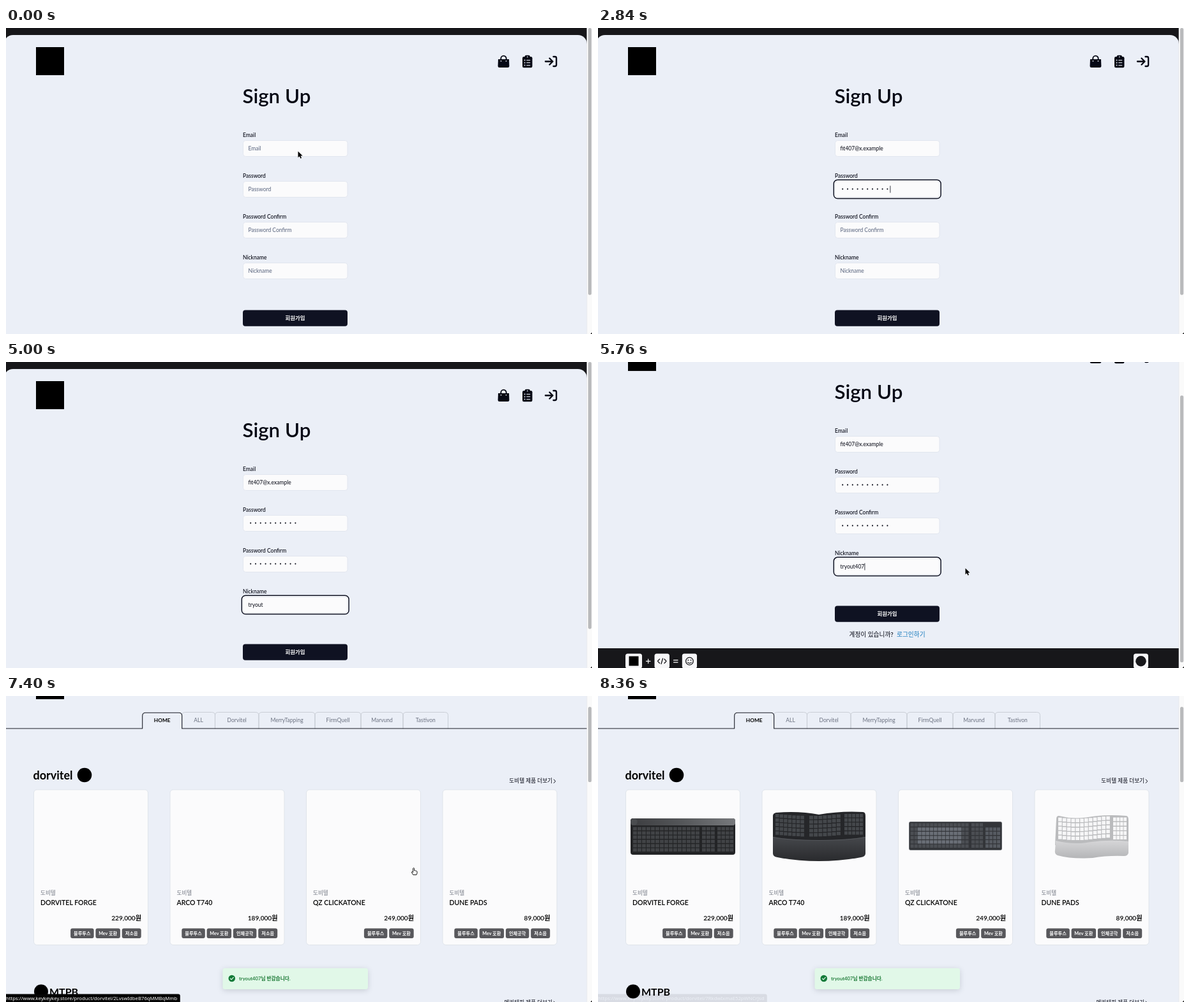
An HTML page that plays this animation: 918 by 480 pixels, repeating every 8400 ms.

```html
<!DOCTYPE html>
<html lang="ko">
<head>
<meta charset="utf-8">
<title>Sign Up</title>
<style>
  html, body { margin: 0; width: 100%; height: 100%; overflow: hidden; background: #ebeff7; }
  svg { display: block; width: 918px; height: 480px; font-family: Lato, "Noto Sans CJK KR", "Noto Sans CJK", sans-serif; }
  .toast { filter: drop-shadow(0 2.5px 4.5px rgba(20, 30, 45, .16)); }
</style>
</head>
<body>
<svg id="stage" viewBox="0 0 918 480" xmlns="http://www.w3.org/2000/svg">
  <defs>
    <linearGradient id="metal"><stop offset="0" stop-color="#3c3d40"/><stop offset=".5" stop-color="#55575a"/><stop offset="1" stop-color="#77797c"/></linearGradient>
    <linearGradient id="rest" x2="0" y2="1"><stop offset="0" stop-color="#46484c"/><stop offset="1" stop-color="#292a2d"/></linearGradient>
    <linearGradient id="pale" x2="0" y2="1"><stop offset="0" stop-color="#d6d6d8"/><stop offset="1" stop-color="#b4b5b7"/></linearGradient>
  </defs>
</svg>
<script>
const LOOP = 8400, MAX_SCROLL = 69;
const INK = '#060814', BG = '#ebeff7', CARD = '#fbfbfc', DARK = '#17171a', NAVY = '#0f1222';
const LOADING_AT = 6640, HOME_AT = 7160;

const stage = document.getElementById('stage');

function el(parent, tag, attrs) {
  const node = document.createElementNS('http://www.w3.org/2000/svg', tag);
  set(node, attrs || {});
  parent.appendChild(node);
  return node;
}
function set(node, attrs) {
  for (const k in attrs) node.setAttribute(k, attrs[k]);
}
const group = (p, attrs) => el(p, 'g', attrs);
const rect = (p, x, y, width, height, fill, rx = 0, more = {}) =>
  el(p, 'rect', { x, y, width, height, fill, rx, ...more });
const circle = (p, cx, cy, r, fill, more = {}) => el(p, 'circle', { cx, cy, r, fill, ...more });
const path = (p, d, fill, more = {}) => el(p, 'path', { d, fill, ...more });
const line = (p, d, stroke, width, more = {}) =>
  path(p, d, 'none', { stroke, 'stroke-width': width, 'stroke-linecap': 'round', 'stroke-linejoin': 'round', ...more });
function text(p, str, x, y, size, fill = INK, weight = 400, anchor = 'start') {
  const node = el(p, 'text', { x, y, fill, 'font-size': size, 'font-weight': weight, 'text-anchor': anchor });
  node.textContent = str;
  return node;
}
const show = (node, on) => node.setAttribute('visibility', on ? 'inherit' : 'hidden');
const clamp = v => Math.max(0, Math.min(1, v));
const easeOut = p => 1 - Math.pow(1 - clamp(p), 3);
const smooth = p => p * p * (3 - 2 * p);

// ---------- sign-up page ----------
const page = group(stage);
rect(page, 0, 0, 910, 40, DARK);
rect(page, -3, 11, 913, 60, BG, 14);
rect(page, 0, 40, 910, 469, BG);
rect(page, 47, 30, 44, 44, '#000');

// header icons
path(page, 'M771 49h17l.4 10.5q0 2.5-2.5 2.5h-12.8q-2.5 0-2.5-2.5z', INK);
line(page, 'M775.3 50v-2.2a4.2 4.2 0 0 1 8.4 0v2.2', INK, 1.9);
circle(page, 775.5, 51.8, 0.9, BG);
circle(page, 783.5, 51.8, 0.9, BG);
rect(page, 809, 45, 15.5, 17.3, INK, 2.3);
rect(page, 812.8, 42.8, 8, 5, INK, 1.8);
circle(page, 816.8, 45.3, 0.9, BG);
for (const y of [50.5, 54.5, 58.5]) {
  circle(page, 812.6, y, 0.9, BG);
  line(page, `M815.8 ${y}h5`, BG, 1.2);
}
line(page, 'M845 52.5h11M851.5 47.5l5 5l-5 5', INK, 2.3);
line(page, 'M857.5 45h2.5q2.2 0 2.2 2.2v10.6q0 2.2-2.2 2.2h-2.5', INK, 2.3);

text(page, 'Sign Up', 370.5, 117.5, 31.3, INK, 600);

const fields = [
  { label: 'Email', value: 'fit407@x.example', focus: 240,
    keys: [540, 620, 800, 840, 1040, 1080, 1280, 1520, 1600, 1640, 1680, 1760, 1800, 1880, 1920, 1960] },
  { label: 'Password', secret: true, focus: 2120,
    keys: [2200, 2240, 2280, 2320, 2480, 2520, 2600, 2680, 2760, 2800] },
  { label: 'Password Confirm', secret: true, focus: 2920,
    keys: [3000, 3040, 3080, 3160, 3200, 3240, 3280, 3320, 3360, 3440] },
  { label: 'Nickname', value: 'tryout407', focus: 3720,
    keys: [4200, 4240, 4280, 4360, 4640, 4720, 5160, 5200, 5240] }
];
fields.forEach((f, i) => {
  const y = 176.5 + 64 * i;
  f.blur = i < 3 ? fields[i + 1].focus : LOADING_AT;
  text(page, f.label, 371, y - 5.5, 8.5, INK, 500);
  f.ring = rect(page, 369.3, y - 2.2, 167.8, 29.2, '#fff', 6, { stroke: NAVY, 'stroke-width': 1.5 });
  f.box = group(page);
  rect(f.box, 371.5, y, 163.5, 25, CARD, 4, { stroke: '#dde3ec', 'stroke-width': 0.8 });
  f.hint = text(f.box, f.label, 379.5, y + 15, 8.5, '#56627c');
  if (f.secret) f.dots = f.keys.map((_, n) => circle(f.box, 383.2 + 7.8 * n, y + 12.1, 1.05, INK));
  else f.text = text(f.box, '', 379.5, y + 15, 8.5);
  f.caret = rect(f.box, 379, y + 7, 0.8, 11, INK);
});

const button = rect(page, 371, 442.5, 164, 25.2, NAVY, 4);
const buttonText = text(page, '회원가입', 453, 457.6, 8.4, '#fff', 600, 'middle');
const spinner = circle(page, 453, 455, 6, 'none', {
  stroke: '#edeef2', 'stroke-width': 1.4, 'stroke-dasharray': '30 7.7', 'stroke-linecap': 'round'
});
text(page, '계정이 있습니까?', 393.5, 491, 9.7, INK, 500);
text(page, '로그인하기', 468, 491, 9.7, '#1579bd', 500);

// footer
rect(page, 0, 509, 910, 60, DARK);
const tile = (x, w) => rect(page, x, 517.5, w, 23.2, '#f6f6f8', 3.5);
tile(43, 26);
rect(page, 48.5, 521.5, 15, 15, '#000');
line(page, 'M75.5 529.3h6.5M78.7 526v6.5M118.5 527.6h6.5M118.5 531h6.5', '#fff', 1.2);
tile(88.5, 23.5);
line(page, 'M96.5 526l-3 3.2l3 3.2M104 526l3 3.2l-3 3.2M101.5 525l-2.5 8.5', DARK, 1.3);
tile(131.8, 23.2);
circle(page, 143.4, 529.2, 5.8, 'none', { stroke: DARK, 'stroke-width': 1.3 });
circle(page, 141.3, 527.6, 0.9, DARK);
circle(page, 145.5, 527.6, 0.9, DARK);
line(page, 'M140.6 531q2.8 2.8 5.6 0', DARK, 1.2);
tile(839, 23);
circle(page, 850.5, 529.2, 8.3, DARK);

// ---------- home page ----------
const home = group(stage);
rect(home, 0, 0, 910, 480, BG);
rect(home, 47, 0, 44, 5, '#000');

const edges = [213.7, 275.7, 327.5, 396, 484, 556, 622, 692.5];
const tabs = ['HOME', 'ALL', 'Dorvitel', 'MerryTapping', 'FirmQuell', 'Marvund', 'Tastivon'];
const tabShape = (a, b, top) => `M${a} 51V${top + 5}q0-5 5-5H${b - 5}q5 0 5 5V51`;
tabs.forEach((name, i) => {
  const a = edges[i], b = edges[i + 1], mid = (a + b) / 2;
  if (i) line(home, tabShape(a, b, 25.5), '#c6cad2', 0.9);
  text(home, name, mid, 40.8, i ? 8.5 : 8.3, i ? '#6b7180' : '#000', i ? 400 : 700, 'middle');
});
line(home, `M0 51${tabShape(edges[0], edges[1], 26.3).replace('M', 'L')}H910`, '#1b1d26', 1.1);

text(home, 'dorvitel', 42.5, 130.5, 18, '#000', 700);
circle(home, 123, 124, 11.3, '#000');
text(home, '도비텔 제품 더보기', 856, 136, 8.6, INK, 400, 'end');
line(home, 'M858.3 131l2.4 2.7l-2.4 2.7', INK, 1);

const tagWidth = { '블루투스': 36.5, 'Mev 호환': 38.5, '인체공학': 36.5, '저소음': 30 };
const [bt, mev, ergo, quiet] = Object.keys(tagWidth);
const cards = [
  { x: 43.5, name: 'DORVITEL FORGE', price: '229,000원', tags: [bt, mev, quiet], load: 7920, draw: drawWide },
  { x: 257, name: 'ARCO T740', price: '189,000원', tags: [bt, mev, ergo, quiet], load: 7840, draw: drawCurved },
  { x: 470.5, name: 'QZ CLICKATONE', price: '249,000원', tags: [bt, mev], load: 7760, draw: drawBlock },
  { x: 684, name: 'DUNE PADS', price: '89,000원', tags: [bt, mev, ergo, quiet], load: 7640, draw: drawPale }
];
for (const c of cards) {
  rect(home, c.x, 147, 179, 243.5, CARD, 5, { stroke: '#dde2e9', 'stroke-width': 0.9 });
  c.photo = group(home);
  c.draw(c.photo);
  text(home, '도비텔', c.x + 10.5, 312, 8.6, '#737883');
  text(home, c.name, c.x + 10.5, 327.6, 10.5, '#000', 600);
  text(home, c.price, c.x + 168.5, 352, 10.1, '#000', 600, 'end');
  let right = c.x + 168.2;
  for (const tag of [...c.tags].reverse()) {
    const w = tagWidth[tag];
    rect(home, right - w, 364.6, w, 15.4, '#58585c', 3);
    text(home, tag, right - w / 2, 374.8, 7.2, '#fff', 700, 'middle');
    right -= w + 2.8;
  }
}

// grid of keys; bend(x) shifts each key vertically
function keys(p, x, y, w, h, cols, rows, fill, bend = () => 0) {
  const kw = w / cols, kh = h / rows;
  let d = '';
  for (let r = 0; r < rows; r++) for (let c = 0; c < cols; c++) {
    const kx = x + c * kw, ky = y + r * kh + bend(kx);
    d += `M${kx.toFixed(1)} ${ky.toFixed(1)}h${(kw * 0.84).toFixed(1)}v${(kh * 0.8).toFixed(1)}h${(-kw * 0.84).toFixed(1)}z`;
  }
  path(p, d, fill);
}
function drawWide(p) {
  rect(p, 51, 192, 164, 57, '#232426', 4);
  rect(p, 51, 192, 164, 11, 'url(#metal)', 4);
  circle(p, 56.5, 197.5, 5.2, '#4a4c4f');
  keys(p, 55, 205.5, 105, 40, 15, 6, '#414346');
  keys(p, 163, 205.5, 21, 40, 3, 6, '#414346');
  keys(p, 187, 205.5, 26, 40, 4, 6, '#414346');
}
function drawCurved(p) {
  path(p, 'M279 183Q315 180 346 186Q380 180 415 182Q419 182 419 188V228H274V188Q274 184 279 183z', '#252629');
  const bend = x => Math.sin((x - 277) / 105 * Math.PI) * 3;
  keys(p, 278, 185, 46, 34, 7, 5, '#44474b', bend);
  keys(p, 331, 185, 50, 34, 7, 5, '#44474b', bend);
  keys(p, 386, 185, 30, 34, 5, 5, '#44474b');
  path(p, 'M274 221Q300 226 346 226Q392 226 419 221V247Q419 252 412 253Q380 259 346 259Q312 259 281 253Q274 252 274 247z', 'url(#rest)');
  line(p, 'M274.500 221.500Q300 226.500 346 226.500Q392 226.500 418.500 221.500', '#5d6065', 0.7);
}
function drawBlock(p) {
  rect(p, 487.5, 197.5, 145, 44, '#333539', 2, { stroke: '#62656a', 'stroke-width': 1 });
  keys(p, 489.5, 199.5, 92, 40, 15, 6, '#4b4e53');
  keys(p, 501, 206.2, 69, 26.7, 11, 4, '#6a6f77');
  keys(p, 585, 199.5, 19, 40, 3, 6, '#4b4e53');
  keys(p, 607, 206.2, 24, 33, 4, 5, '#565a61');
}
function drawPale(p) {
  path(p, 'M722 188Q745 194 768 190Q795 185 828 188Q831 189 831 194V234H716L718 193Q718 188 722 188z', '#babbbd');
  const bend = x => Math.sin((x - 718) / 57 * Math.PI) * 2;
  keys(p, 721, 190.5, 82, 35, 12, 5, '#f6f6f7', bend);
  keys(p, 807, 190.5, 22, 36, 4, 5, '#f6f6f7');
  path(p, 'M717 227Q745 234 772 229Q800 225 831 228V246Q830 251 824 251Q798 250 775 254Q742 256 720 250Q715 248 716 242z', 'url(#pale)');
}

circle(home, 55, 463.5, 11, '#000');
text(home, 'MTPB', 68, 469.5, 16, '#000', 700);
text(home, '메리태핑 제품 더보기', 856, 484, 8.6, INK, 400, 'end');
line(home, 'M858.3 479l2.4 2.7l-2.4 2.7', INK, 1);

const toast = group(home, { class: 'toast' });
rect(toast, 339.5, 427, 227.5, 33, '#e1f8e8', 3.5);
circle(toast, 353.8, 443, 5.3, '#137a38');
line(toast, 'M351.4 443.2l1.7 1.7l3.2-3.5', '#e1f8e8', 1.2);
text(toast, 'tryout407님 반갑습니다.', 365, 445.5, 7.7, '#14752f', 600);

const status = group(home);
const statusBox = rect(status, -4, 467.5, 275, 16, '#050505', 3);
const statusText = text(status, '', 0, 476.8, 7.73, '#fff', 500);
statusText.setAttribute('font-family', '"Noto Sans", sans-serif');
const linkBase = 'https://www.keykeykey.store/product/dorvitel/';

// ---------- scrollbar and pointer ----------
rect(stage, 910, 0, 8, 480, '#fafafa');
rect(stage, 909.7, 0, 0.6, 480, '#e4e5e8');
const thumb = rect(stage, 912, 0, 5.2, 418, '#b9babc', 2.6);
path(stage, 'M918 477.5v2.5h-2.5z', '#222');

const arrow = path(stage, 'M0 0V9.8L2.3 7.7L3.9 11.3L5.5 10.6L4 7.1H7.1Z', '#000',
  { stroke: '#fff', 'stroke-width': 0.8, 'paint-order': 'stroke' });
const hand = path(stage,
  'M-1 .8Q0-.6 1 .8V4.500Q2 3.800 2.800 4.700Q3.800 4.200 4.400 5.200Q5.400 5 5.400 6.500V8.500L4.400 11H-.8L-3 7.600Q-3.400 6-2.200 6.200L-1 7.300Z',
  '#fff', { stroke: '#000', 'stroke-width': 0.9, 'stroke-linejoin': 'round' });

const track = [
  [0, 457.5, 193.5], [120, 457.5, 193.5], [220, 456, 189], [300, 456, 189], [640, 567.5, 305],
  [5360, 567.5, 305], [5480, 575.5, 323.5], [6320, 575.5, 323.5], [6560, 470, 388],
  [6700, 470, 388], [7100, 643.5, 271], [7160, 643.5, 271], [7300, 638.6, 269.5],
  [7440, 638.6, 269.5], [7800, 490, 330], [8120, 250, 490]
];
function pointerAt(t) {
  const n = track.findIndex(k => k[0] > t);
  if (n < 0) return track[track.length - 1].slice(1);
  const a = track[n - 1], b = track[n], p = smooth((t - a[0]) / (b[0] - a[0]));
  return [a[1] + (b[1] - a[1]) * p, a[2] + (b[2] - a[2]) * p];
}

function drawField(f, t, loading) {
  const n = f.keys.filter(k => k <= t).length;
  const focused = t >= f.focus && t < f.blur;
  const last = n ? f.keys[n - 1] : f.focus;
  show(f.ring, focused);
  show(f.hint, !n);
  f.box.setAttribute('opacity', loading ? 0.5 : 1);
  let x;
  if (f.secret) {
    f.dots.forEach((d, i) => show(d, i < n));
    x = 379.5 + 7.8 * n;
  } else {
    f.text.textContent = f.value.slice(0, n);
    x = 379.7 + (n ? f.text.getComputedTextLength() : 0);
  }
  f.caret.setAttribute('x', x);
  show(f.caret, focused && (t - last) % 520 < 260);
}

function render(t) {
  const atHome = t >= HOME_AT, loading = t >= LOADING_AT && !atHome;
  const scroll = MAX_SCROLL * easeOut((t - 5520) / 490);
  const [px, py] = pointerAt(t);

  show(page, !atHome);
  show(home, atHome);
  page.setAttribute('transform', `translate(0 ${-scroll})`);
  fields.forEach(f => drawField(f, t, loading));

  const onButton = !atHome && !loading && px > 371 && px < 535 && py > 442.5 - scroll && py < 467.5 - scroll && t > 6320;
  set(button, { fill: onButton ? '#252838' : NAVY, opacity: loading ? 0.55 : 1 });
  show(buttonText, !loading);
  show(spinner, loading);
  spinner.setAttribute('transform', `rotate(${(t - 7120) * 0.36 + 231} 453 455)`);

  const height = atHome ? 1936 : 549;
  set(thumb, { y: scroll * 480 / height, height: 480 * 480 / height - 1 });

  let onCard = false;
  if (atHome) {
    for (const c of cards) {
      c.photo.setAttribute('opacity', smooth(clamp((t - c.load) / 400)));
      if (px > c.x && px < c.x + 179 && py > 147 && py < 390) onCard = true;
    }
    const p = easeOut((t - 7180) / 200);
    set(toast, { opacity: p, transform: `translate(0 ${(1 - p) * 40})` });
    statusText.textContent = linkBase + (t < 7800 ? '2LvswIdbeB76qMMBqMmb' : '7RkdwIxmaE52pWNCrJsd');
    statusBox.setAttribute('width', statusText.getComputedTextLength() + 8.5);
    status.setAttribute('opacity', Math.min(clamp((t - 7220) / 80), clamp((8380 - t) / 240)));
  }

  const visible = t < 800 || t >= 5360, pointing = onButton || onCard;
  const place = `translate(${px} ${py})`;
  show(arrow, visible && !pointing);
  show(hand, visible && pointing);
  arrow.setAttribute('transform', place);
  hand.setAttribute('transform', place);
}

const start = performance.now();
function tick() {
  render((performance.now() - start) % LOOP);
  requestAnimationFrame(tick);
}
tick();
</script>
</body>
</html>
```
